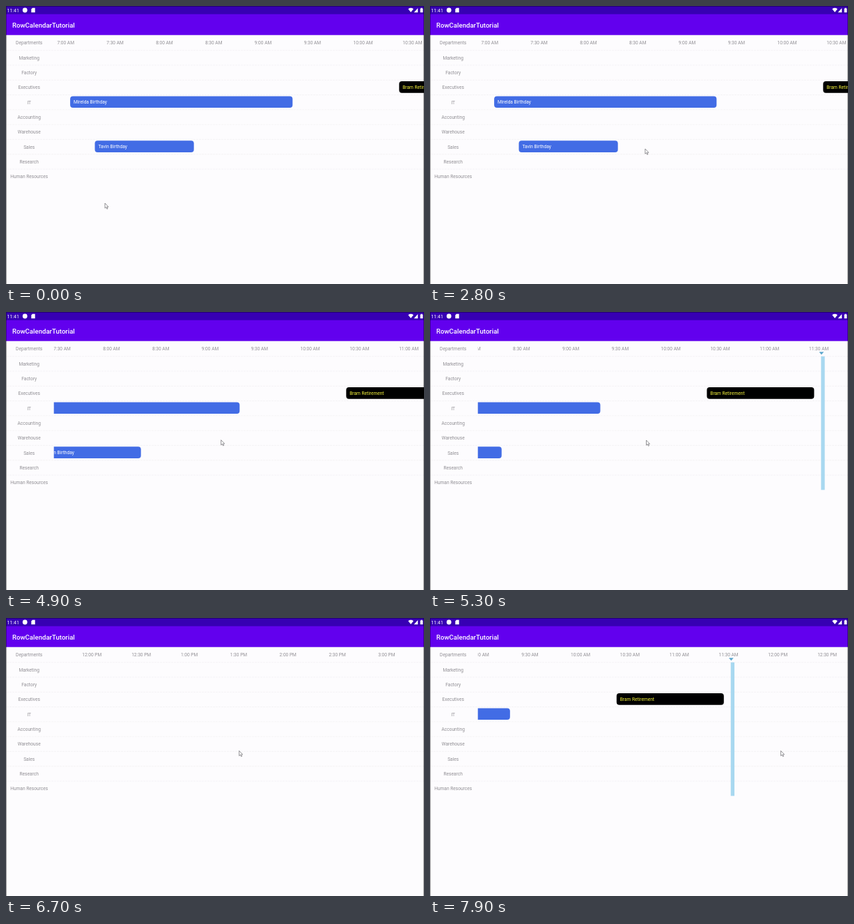
An HTML page that plays this animation: 600 by 399 pixels, repeating every 8000 ms.

```html
<!DOCTYPE html>
<html lang="en">
<head>
<meta charset="utf-8">
<title>Department timeline</title>
<style>
  html, body { margin: 0; width: 100%; height: 100%; overflow: hidden; background: #fdfcfe; }
  svg { display: block; width: 600px; height: 399px; }
  text { font: 6.6px Roboto, sans-serif; fill: #918f94; }
  .clock { font-size: 7px; fill: #fff; }
  .title { font-size: 9.6px; font-weight: 500; fill: #fff; }
  .middle { text-anchor: middle; }
</style>
</head>
<body>
<svg viewBox="0 0 600 399">
  <defs><clipPath id="viewport"><rect x="68.7" y="42" width="531.3" height="357"/></clipPath></defs>
  <rect width="600" height="399" fill="#fdfcfe"/>
  <g id="lines" stroke="#f1eff2" stroke-width=".7" stroke-dasharray="3 1"></g>
  <g id="labels" class="middle"></g>
  <g clip-path="url(#viewport)"><g id="content"></g></g>

  <rect width="600" height="41.7" fill="#6200ee"/>
  <rect width="600" height="11.7" fill="#3700b3"/>
  <text class="clock" x="1.5" y="8.8">11:41</text>
  <g fill="#fff">
    <circle cx="27.2" cy="6" r="3.4"/>
    <path d="M38 2.8h3.7v6.4h-5.4V4.6z"/>
    <path d="M577.3 4.2q3.8-2.8 7.6 0L581.1 9z"/>
    <path d="M591.2 3v6.2h-5.6z"/>
    <path d="M594.6 3.6h1.1v-.8h1.6v.8h1.1v5.7h-3.8z"/>
  </g>
  <text class="title" x="9" y="31">RowCalendarTutorial</text>

  <path d="M.4 399V.4H599.6V399" fill="none" stroke="#000" stroke-opacity=".5" stroke-width=".8"/>
  <path id="pointer" d="M0 0V7.2L1.7 5.7L2.9 8.3L4 7.8L2.9 5.3H5z" fill="#fff" stroke="#727076" stroke-width=".75"/>
</svg>
<script>
const LOOP = 8000, STEP = 100;
const ROW = 21.3, HEADER_Y = 53, COLUMN_X = 69, PX_PER_MINUTE = 2.361;
const $ = id => document.getElementById(id);

function add(parent, tag, attrs, content = '') {
  const node = document.createElementNS('http://www.w3.org/2000/svg', tag);
  for (const key in attrs) node.setAttribute(key, attrs[key]);
  node.textContent = content;
  parent.appendChild(node);
}

const rowY = row => HEADER_Y + row * ROW;
const timeX = minutes => COLUMN_X + minutes * PX_PER_MINUTE;
const content = $('content');

const departments = ['Departments', 'Marketing', 'Factory', 'Executives', 'IT',
  'Accounting', 'Warehouse', 'Sales', 'Research', 'Human Resources'];
departments.forEach((name, row) => {
  add($('labels'), 'text', { x: 33.2, y: rowY(row) + 2.4 }, name);
  if (row) add($('lines'), 'path', { d: `M1 ${rowY(row - .5)}H600` });
});

// Half-hour headings, counted from 7:00 AM
for (let i = 0; i < 24; i++) {
  const hour = 7 + Math.floor(i / 2);
  const label = `${(hour + 11) % 12 + 1}:${i % 2 ? '30' : '00'} ${hour < 12 ? 'AM' : 'PM'}`;
  add(content, 'text', { x: timeX(i * 30) + 4.5, y: HEADER_Y + 2.4 }, label);
}

function addEvent(department, start, end, name, fill, color) {
  const x = timeX(start) - .5, y = rowY(departments.indexOf(department));
  add(content, 'rect', { x, y: y - 8.8, width: timeX(end) - x, height: 16.7, rx: 4, fill });
  add(content, 'text', { x: x + 4.9, y: y + 2.1, style: `fill:${color}` }, name);
}
addEvent('IT', 10, 145, 'Mirelda Birthday', '#426ce5', '#fff');
addEvent('Sales', 25, 85, 'Tavin Birthday', '#426ce5', '#fff');
addEvent('Executives', 210, 275, 'Bram Retirement', '#000', '#f4f23c');

// Current-time marker, from the first row to the last
add(content, 'rect', { x: 728.2, y: rowY(.5), width: 5.3, height: 9 * ROW, fill: '#a8d8f0' });
add(content, 'path', { d: 'M725.4 57.2h6.8l-3.4 4z', fill: '#5ca6cc' });

// The pointer wanders, then drags the timeline forward and back.
const poses = [
  { at: 0, x: 142, y: 283, scroll: 0 },
  { at: 1000, x: 282, y: 222.5, scroll: 0 },
  { at: 1700, x: 282, y: 222.5, scroll: 0 },
  { at: 3900, x: 335.7, y: 187.5, scroll: 0 },
  { at: 4500, x: 384, y: 185, scroll: 0 },
  { at: 4900, x: 308.7, y: 183.7, scroll: 76 },
  { at: 5800, x: 312.7, y: 184.4, scroll: 280.5 },
  { at: 6700, x: 334.7, y: 190.6, scroll: 672.5 },
  { at: 7900, x: 503.6, y: 190.6, scroll: 296.5 }
];

function poseAt(time) {
  const next = Math.max(1, poses.findIndex(pose => pose.at >= time));
  const a = poses[next - 1], b = poses[next];
  const p = (time - a.at) / (b.at - a.at);
  const mix = key => a[key] + (b[key] - a[key]) * p;
  return { x: mix('x'), y: mix('y'), scroll: mix('scroll') };
}

const started = performance.now();
function draw(now) {
  const elapsed = Math.max(0, now - started) % LOOP;
  const { x, y, scroll } = poseAt(Math.floor(elapsed / STEP) * STEP);
  content.setAttribute('transform', `translate(${-scroll} 0)`);
  $('pointer').setAttribute('transform', `translate(${x} ${y})`);
  requestAnimationFrame(draw);
}
draw(started);
</script>
</body>
</html>
```
